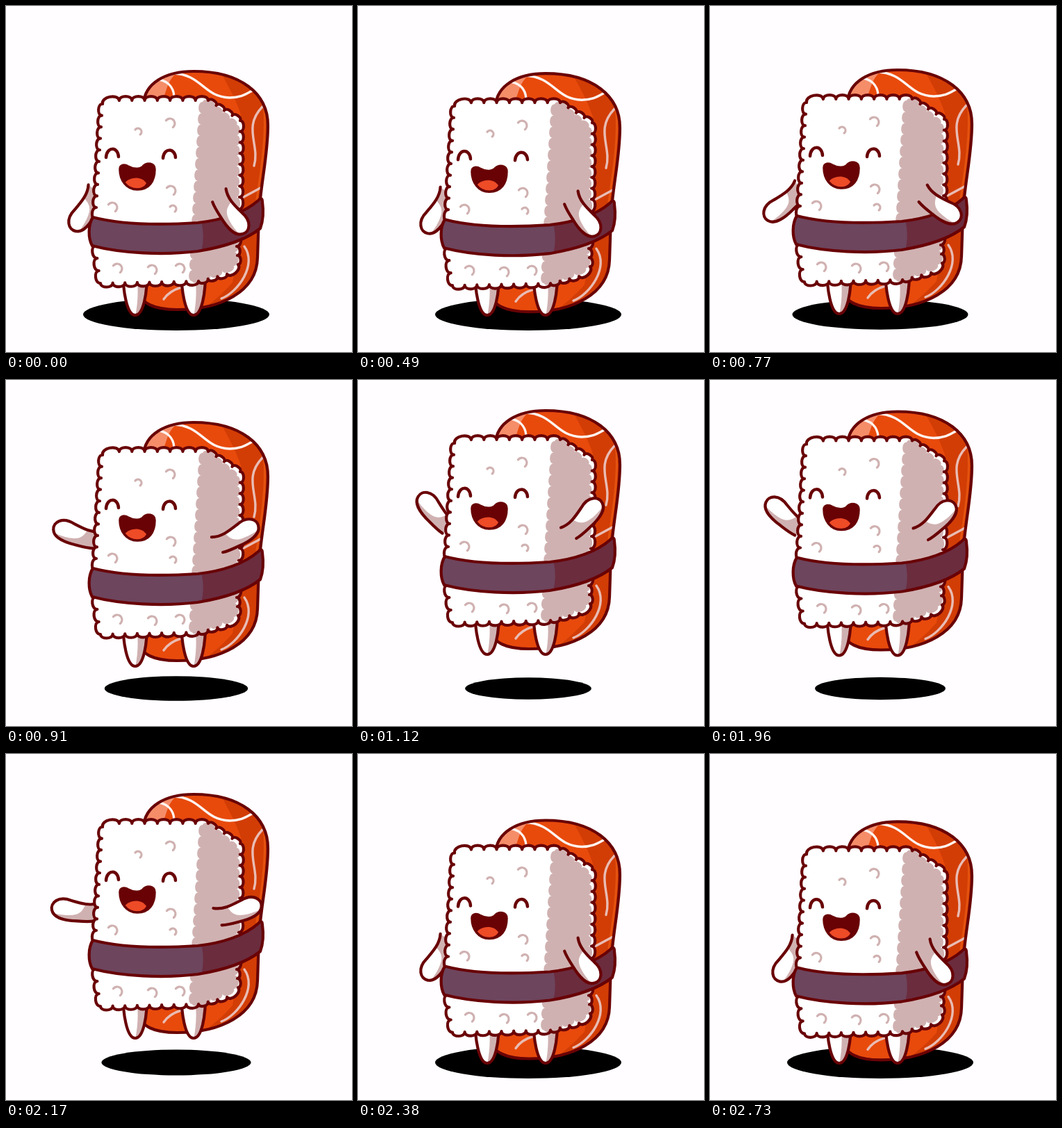
Write an HTML page with a canvas that moves like this. It is 498x498 px and loops after 3220 ms.

```html
<!DOCTYPE html>
<html lang="en">
<head>
<meta charset="utf-8">
<title>Jumping sushi</title>
<style>
  html, body { margin: 0; width: 100%; height: 100%; overflow: hidden; background: #fffdff; }
  canvas { display: block; }
</style>
</head>
<body>
<canvas id="stage" width="498" height="498"></canvas>
<script>
const ctx = document.getElementById('stage').getContext('2d');
const LOOP = 3220, TICK = 70;
const INK = '#690205', RICE = '#ffffff', SHADE = '#d0b1b1';

// time, body offset, jump progress (arms and shadow)
const KEYS = [
  [0, 0, 0], [210, 1.1, 0], [490, 3.2, 0], [630, 3.5, .01], [700, 2.5, .06],
  [770, -2, .17], [840, -18, .48], [910, -33, .7], [980, -42, .84],
  [1050, -47, .93], [1120, -50, .98], [1190, -51.5, .99], [1260, -52, 1],
  [1680, -52, 1], [1750, -51.2, .98], [1960, -48.5, .91], [2100, -42.5, .76],
  [2170, -36, .6], [2240, -13, .23], [2310, -1, .04], [2380, 1.5, 0],
  [2730, 3.3, 0], [LOOP, 3.3, 0]
];

function poseAt(t) {
  const i = KEYS.findIndex(k => k[0] > t);
  const a = KEYS[i - 1], b = KEYS[i];
  const u = (t - a[0]) / (b[0] - a[0]);
  return { lift: a[1] + (b[1] - a[1]) * u, jump: a[2] + (b[2] - a[2]) * u };
}

// Closed clockwise outline of bumps; each later point is [x, y, bumps on the edge]
function scallop(x, y, edges) {
  const path = new Path2D();
  path.moveTo(x, y);
  for (const [ex, ey, n] of edges) {
    const dx = (ex - x) / n, dy = (ey - y) / n;
    const nx = dy * .43, ny = -dx * .43;
    for (let i = 0; i < n; i++) {
      const px = x + dx * i, py = y + dy * i;
      path.bezierCurveTo(px + nx, py + ny, px + dx + nx, py + dy + ny, px + dx, py + dy);
    }
    x = ex; y = ey;
  }
  path.closePath();
  return path;
}

const riceShape = scallop(139, 141, [
  [163, 136, 1], [291, 136, 7], [337, 165, 4], [336, 275, 7], [332, 346, 4],
  [334, 372, 2], [318, 386, 1], [277, 396, 3], [136, 399, 8], [129, 345, 3],
  [130, 290, 3], [139, 141, 9]
]);
const riceSide = scallop(283, 138, [
  [301, 146, 1], [332, 171, 3], [331, 275, 7], [328, 374, 5],
  [277, 395, 3], [268, 396, 1], [273, 300, 6], [283, 138, 10]
]);

const salmon = new Path2D('M198 140C200 112 228 94 270 94C338 94 377 126 377 172C377 216 366 258 364 302L362 362C361 412 308 437 246 437C216 437 192 430 188 404Z');
const salmonDark = new Path2D('M306 90C318 112 330 132 338 156L342 300L326 398C306 420 292 430 278 440L370 440L385 90Z');
const salmonGlow = new Path2D('M200 134C204 112 224 100 246 96C232 108 232 120 226 134Z');
const salmonRim = new Path2D('M371 142C376 180 367 240 361 278');
const veins = new Path2D('M240 97C282 98 284 131 322 132C338 132 345 127 354 122M214 105C232 106 241 116 242 130');
const dimVeins = new Path2D('M369 145C340 175 366 200 357 230M366 262L340 276M343 346C362 372 334 412 310 421M252 405C242 408 233 413 227 422');

const belt = new Path2D('M125 304C170 316 230 315 276 312C312 308 344 297 363 280C366 276 369 276 369 282C371 296 370 309 366 320C344 338 312 347 276 353C226 359 166 356 124 345C118 334 118 315 125 304Z');
const beltDark = new Path2D('M278 300C286 324 285 340 279 362L380 350V268Z');

const mouth = new Path2D('M164 235C164 228 171 228 176 231C185 236 194 235 198 230C203 225 214 226 214 235C214 252 206 264 189 264C173 264 164 250 164 235Z');
const tongue = new Path2D('M171 255C177 246 195 244 202 255C197 265 178 266 171 255Z');
const eyes = new Path2D('M144 218C145 202 161 202 162 217M226 219C227 204 243 204 244 218');
const grains = [[190, 181, 5], [236, 169, 7], [153, 290, 7], [237, 266, 7],
  [240, 292, 5], [160, 378, 7], [210, 380, 7], [250, 378, 7]];

const leg = new Path2D('M0 -28C0 8 6 42 18 42C29 42 36 14 35 -28Z');
const legLight = new Path2D('M-5 -28H15C25 -4 22 24 17 50H-5Z');

// Arm along +x, with the shoulder at the origin
const arm = new Path2D('M0 -16C12 -9 26 -11 41 -13C60 -17 70 -5 66 5C62 16 44 17 28 15C16 14 9 13 3 11');
const armLight = new Path2D('M14 -30C22 -8 18 4 38 8C48 10 56 10 80 8V-30Z');

function clipped(shape, paint) {
  ctx.save();
  ctx.clip(shape);
  paint();
  ctx.restore();
}

function fill(path, color) {
  ctx.fillStyle = color;
  ctx.fill(path);
}

function stroke(path, color = INK, width = 4.2) {
  ctx.strokeStyle = color;
  ctx.lineWidth = width;
  ctx.stroke(path);
}

function at(x, y, paint, angle = 0, flip = 1) {
  ctx.save();
  ctx.translate(x, y);
  ctx.scale(flip, 1);
  ctx.rotate(angle * Math.PI / 180);
  paint();
  ctx.restore();
}

function drawLimb(shape, light) {
  fill(shape, SHADE);
  clipped(shape, () => fill(light, RICE));
  stroke(shape);
}

function drawShadow(jump) {
  const rx = 134 - 44 * jump;
  ctx.fillStyle = '#000';
  ctx.beginPath();
  ctx.ellipse(245, 444, rx, rx * .172, 0, 0, Math.PI * 2);
  ctx.fill();
}

function drawSalmon() {
  fill(salmon, '#e84a0c');
  clipped(salmon, () => {
    fill(salmonDark, '#d23d05');
    fill(salmonGlow, '#f58d69');
    stroke(salmonRim, '#e4530f', 3);
    stroke(veins, '#fff4f0', 3.4);
    stroke(dimVeins, '#e9bcb4', 3.4);
  });
  stroke(salmon);
}

function drawRice() {
  fill(riceShape, RICE);
  fill(riceSide, SHADE);
  for (const [x, y, r] of grains) {
    const arc = new Path2D();
    arc.arc(x, y, r, -2.5, .9);
    stroke(arc, SHADE, 3.2);
  }
  stroke(riceShape);
}

function drawFace() {
  stroke(eyes, INK, 4.5);
  fill(mouth, INK);
  clipped(mouth, () => fill(tongue, '#ee4b27'));
  stroke(mouth, INK, 3.5);
}

function drawBelt() {
  fill(belt, '#6d455d');
  clipped(belt, () => fill(beltDark, '#6b2c3e'));
  stroke(belt);
}

function draw(now) {
  const t = Math.floor(now % LOOP / TICK) * TICK;
  const { lift, jump } = poseAt(t);
  const leftAngle = 57 - 110 * jump;
  const rightAngle = 52 - 101 * jump - 80 * jump * jump * (1 - jump);

  ctx.fillStyle = '#fffdff';
  ctx.fillRect(0, 0, 498, 498);
  ctx.lineCap = ctx.lineJoin = 'round';
  drawShadow(jump);

  at(0, lift, drawSalmon);
  // Feet stay planted while the body sinks
  const feet = 403 + Math.min(0, lift);
  for (const x of [168, 252]) at(x, feet, () => drawLimb(leg, legLight));

  at(0, lift, () => {
    at(132, 266, () => drawLimb(arm, armLight), leftAngle, -1);
    drawRice();
    drawFace();
    drawBelt();
    at(304, 273, () => drawLimb(arm, armLight), rightAngle);
  });
}

let start;
function tick(now) {
  start ??= now;
  draw(now - start);
  requestAnimationFrame(tick);
}
draw(0);
requestAnimationFrame(tick);
</script>
</body>
</html>
```
